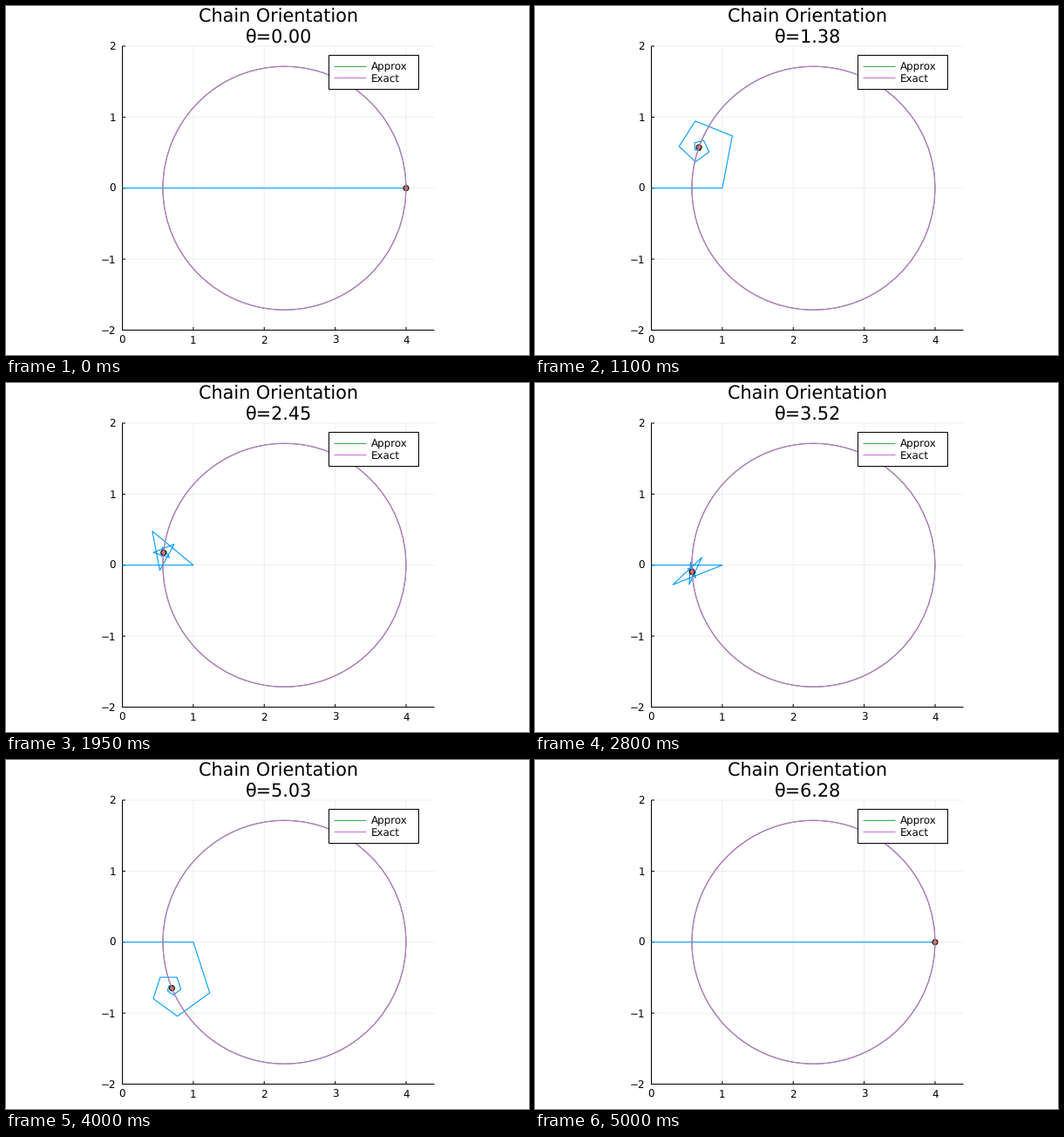
Write a matplotlib script that moves like this. It is 600 px wide and 400 px high and loops after 5050 ms.

```python
import numpy as np
import matplotlib.pyplot as plt
from matplotlib.animation import FuncAnimation
from matplotlib.lines import Line2D
from matplotlib.patches import Circle, Rectangle

W, H, DPI = 600, 400, 100
PX = 72 / DPI                      # one pixel in points
RATIO, LINKS, STEPS = 0.75, 100, 100
BLUE, ORANGE, GREEN, PURPLE = "#009afa", "#e36f47", "#3ea44e", "#c371d2"
LEFT, RIGHT, TOP, BOTTOM = 133.5, 491.5, 46.0, 371.5

plt.rcParams["font.family"] = "DejaVu Sans"
plt.rcParams["text.hinting"] = "none"
fig = plt.figure(figsize=(W / DPI, H / DPI), dpi=DPI, facecolor="white")
ax = fig.add_axes([0, 0, 1, 1])
ax.set_xlim(0, W)
ax.set_ylim(H, 0)
ax.axis("off")

UNIT = (BOTTOM - TOP) / 4


def to_px(z):
    return LEFT + UNIT * np.real(z), (TOP + BOTTOM) / 2 - UNIT * np.imag(z)


def line(xs, ys, color, width=1.0, z=1):
    item = Line2D(xs, ys, color=color, lw=width * PX, zorder=z,
                  solid_capstyle="butt", snap=False)
    ax.add_line(item)
    return item


def text(x, y, s, size, ha="center"):
    return ax.text(x, y, s, fontsize=size * PX, ha=ha, va="baseline", zorder=9)


# Grid, axes and tick labels
for k in range(5):
    x, _ = to_px(k)
    _, y = to_px(1j * (k - 2))
    line([x, x], [TOP, BOTTOM], "#eeeeee")
    line([LEFT, RIGHT], [y, y], "#eeeeee")
    line([x, x], [BOTTOM, BOTTOM - 3.5], "black", z=2)
    line([LEFT, LEFT + 3.5], [y, y], "black", z=2)
    text(x, 387, str(k), 11.9)
    text(126, y + 4.4, str(k - 2).replace("-", "\u2212"), 11.9, "right")
line([LEFT, LEFT], [TOP, BOTTOM + 0.5], "black", z=2)
line([LEFT, RIGHT], [BOTTOM, BOTTOM], "black", z=2)

text(312.6, 19, "Chain Orientation", 20.8)
title = text(313.2, 41.6, "", 20.8)

# Moving chain with its end point, then the two limit curves above them
chain = line([], [], BLUE, 1.1, z=3)
tip = ax.add_patch(Circle((0, 0), 3, facecolor=ORANGE, edgecolor="black",
                          lw=PX, zorder=4))
turn = np.linspace(0, 2 * np.pi, 400)
limit = 1 / (1 - RATIO * np.exp(1j * turn))
for color, z in ((GREEN, 5), (PURPLE, 6)):
    line(*to_px(limit), color, 1.1, z=z)

# Legend
ax.add_patch(Rectangle((370.5, 56.5), 103, 39, facecolor="white",
                       edgecolor="black", lw=PX, zorder=7, snap=False))
for y, name, color in ((69.5, "Approx", GREEN), (82.5, "Exact", PURPLE)):
    line([376.5, 413.5], [y, y], color, z=8)
    text(419.2, y + 4.5, name, 11.9, "left")


def draw(i):
    theta = 2 * np.pi * i / STEPS
    links = (RATIO * np.exp(1j * theta)) ** np.arange(LINKS)
    joints = np.concatenate(([0], np.cumsum(links)))
    chain.set_data(*to_px(joints))
    tip.center = to_px(joints[-1])
    title.set_text(f"\u03b8={theta:.2f}")
    return chain, tip, title


anim = FuncAnimation(fig, draw, frames=STEPS + 1, interval=50,
                     init_func=lambda: draw(0), repeat=True, blit=False)
plt.show()
```
